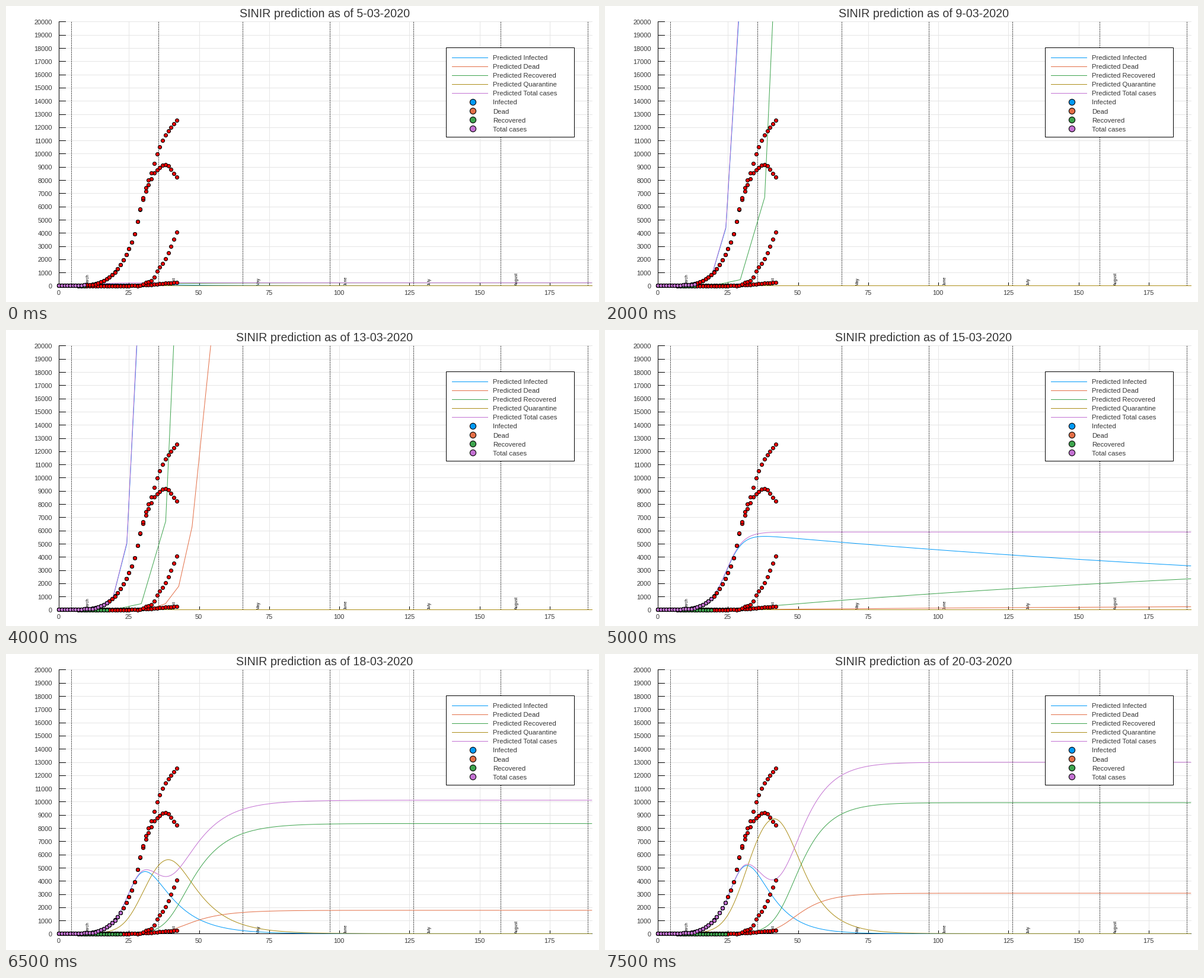
Write a matplotlib script that moves like this. It is 1000 px wide and 500 px high and loops after 8 s.

```python
import numpy as np
import matplotlib.pyplot as plt
from matplotlib.animation import FuncAnimation
from matplotlib.patches import Rectangle

PX = 0.72  # points per pixel at 100 dpi
FRAMES, STEP = 16, 500
DAY, X0, Y0, THOUSAND = 4.73, 89.1, 472.4, 22.3
BLUE, ORANGE, GREEN = "#009afa", "#e36f47", "#3ea44e"
PURPLE, OLIVE, INK = "#c371d2", "#ac8e18", "#363636"

plt.rcParams["font.family"] = "Liberation Sans"


def px(day):
    return X0 + DAY * np.asarray(day, float)


def py(count):
    return Y0 - THOUSAND * np.asarray(count, float) / 1000


LEFT, RIGHT, TOP, BOTTOM = px(0), px(190), py(20000), py(0)


def smooth(x, points):
    """Cubic Hermite curve through a few (day, count) points."""
    t, v = np.array(points, float).T
    slope = np.gradient(v, t)
    i = np.clip(np.searchsorted(t, x, "right") - 1, 0, len(t) - 2)
    h = t[i + 1] - t[i]
    s = np.clip((x - t[i]) / h, 0, 1)
    return ((1 + 2 * s) * (1 - s) ** 2 * v[i] + s * (1 - s) ** 2 * h * slope[i]
            + s * s * (3 - 2 * s) * v[i + 1] + s * s * (s - 1) * h * slope[i + 1])


# Recorded cases
days = np.arange(43)
total = smooth(days, [(0, 2), (5, 14), (9, 41), (14, 182), (17, 504),
                      (20, 1018), (25, 2814), (27, 3924), (28, 4880),
                      (31, 7430), (33, 8560), (35, 9980), (38, 11390),
                      (42, 12519)])
dead = smooth(days, [(0, 0), (16, 0), (24, 6), (28, 28), (32, 68), (36, 146),
                     (42, 243)])
recovered = smooth(days, [(0, 0), (27, 0), (29, 9), (31, 225), (34, 640),
                          (35, 1090), (38, 2022), (42, 4046)])
records = [total - dead - recovered, dead, recovered, total]

T = np.linspace(0, 190, 761)
RUNAWAY = (3, 4, 7, 8)

# Key forecasts, blended in between:
# frame, plateau, midpoint, growth, leaving rate, quarantine days, death share
KEYS = np.array([
    (0, 215, 13.3, 0.33, 0.05, 0, 0),
    (6, 3520, 23.5, 0.27, 0.00598, 0, 0),
    (10, 5880, 24.4, 0.335, 0.00346, 0, 0.087),
    (13, 10110, 25.9, 0.315, 0.1, 13.9, 0.175),
    (15, 12985, 27.4, 0.3, 0.128, 16.5, 0.236)])


def logistic(t, plateau, mid, growth):
    return plateau / (1 + np.exp(-growth * (t - mid)))


def settle(k):
    """Logistic spread; cases leave at a rate, then wait in quarantine."""
    plateau, mid, growth, leave, wait, share = (
        np.interp(k, KEYS[:, 0], col) for col in KEYS[:, 1:].T)
    caught = logistic(T, plateau, mid, growth)
    ill = caught.copy()
    keep = np.exp(-leave * T[1])
    for i in range(1, len(T)):
        ill[i] = ill[i - 1] * keep + caught[i] - caught[i - 1]
    left = caught - ill
    gone = np.interp(T - wait, T, left, left=0)
    return [(T, ill), (T, share * gone), (T, (1 - share) * gone),
            (T, left - gone), (T, ill + gone)]


def runaway(k):
    """Unchecked growth, sampled at coarse steps."""
    t = 4.85 * np.arange(8)
    cases = (4440 + 165 * (k - 4)) * np.exp((0.325 + 0.0025 * (k - 4)) * (t - 24.25))
    heal_t = np.array([0, 20, 29.4, 38.1, 42.8])
    healed = 6700 * np.exp(0.31 * (heal_t - 38.1))
    death_t = 4.75 * np.arange(41)
    deaths = (k > 6) * logistic(death_t, 32000, 52.2, 0.3)
    return [(t, 0.98 * cases), (death_t, deaths), (heal_t, healed),
            (T, 0 * T), (t, cases)]


fig = plt.figure(figsize=(10, 5), dpi=100, facecolor="white")
ax = fig.add_axes([0, 0, 1, 1])
ax.set_xlim(0, 1000)
ax.set_ylim(500, 0)
ax.axis("off")


def rule(xs, ys, color="black", z=2, **kw):
    return ax.plot(xs, ys, color=color, lw=PX, zorder=z, **kw)[0]


def label(x, y, text, size, ha="left", color=INK, z=3, **kw):
    return ax.text(x, y, text, fontsize=size * PX, ha=ha, va="baseline",
                   color=color, zorder=z, **kw)


def dots(xs, ys, color, z, size=6):
    return ax.plot(xs, ys, "o", ms=size * PX, mfc=color, mec="black",
                   mew=1.1 * PX, zorder=z)[0]


# Grid, axes and tick labels
for v in range(0, 20001, 1000):
    y = py(v)
    rule([LEFT, RIGHT], [y, y], "#e5e5e5", 1)
    rule([LEFT, LEFT + 11], [y, y])
    label(78, y + 4.6, str(v), 11, "right")
for d in range(0, 176, 25):
    x = px(d)
    rule([x, x], [TOP, BOTTOM], "#e5e5e5", 1)
    rule([x, x], [BOTTOM, BOTTOM - 5.3])
    label(x - 0.4, 488, str(d), 11, "center")
rule([LEFT, LEFT], [TOP, BOTTOM])
rule([LEFT, RIGHT], [BOTTOM, BOTTOM])

# Month boundaries
months = ["March", "April", "May", "June", "July", "August", ""]
for d, name in zip([4.5, 35.5, 65.5, 96.5, 126.5, 157.5, 188.5], months):
    x = px(d)
    rule([x, x], [BOTTOM, TOP], ls=(0, (1.5, 1.5)), dash_capstyle="butt")
    label(px(d + 5.5) + 2.8, 472, name, 7, color="black", rotation=90,
          rotation_mode="anchor")

# Legend
ax.add_patch(Rectangle((742, 70.4), 216, 151, fc="white", ec="black",
                       lw=PX, zorder=20))
line_colors = [BLUE, ORANGE, GREEN, OLIVE, PURPLE]
dot_colors = [BLUE, ORANGE, GREEN, PURPLE]
names = ["Infected", "Dead", "Recovered", "Quarantine", "Total cases"]
entries = [("Predicted " + n, c, True) for n, c in zip(names, line_colors)]
entries += [(n, c, False) for n, c in zip(names, line_colors) if c != OLIVE]
for i, (name, color, is_line) in enumerate(entries):
    y = 86.6 + 15.1 * i
    if is_line:
        rule([752, 812], [y, y], color, 21)
    else:
        dots([787], [y], color, 21, 10.2)
    label(821, y + 4.4, name, 11.4, z=21)

# Moving parts
window = Rectangle((LEFT, BOTTOM + 1), RIGHT - LEFT + 1, TOP - BOTTOM - 1,
                   transform=ax.transData)
curves = [rule([], [], color, 4) for color in line_colors]
for curve in curves:
    curve.set_clip_path(window)
for row in records:
    dots(px(days), py(row), "red", 5)
known = [dots([], [], color, 6) for color in dot_colors]
title = label(537.2, 19.3, "", 19.7, "center")


def update(k):
    title.set_text(f"SINIR prediction as of {5 + k}-03-2020")
    forecast = runaway(k) if k in RUNAWAY else settle(k)
    for curve, (t, v) in zip(curves, forecast):
        curve.set_data(px(t), py(v))
    n = 10 + k
    for marks, row in zip(known, records):
        marks.set_data(px(days[:n]), py(row[:n]))
    return curves + known + [title]


anim = FuncAnimation(fig, update, frames=FRAMES, interval=STEP, repeat=True,
                     repeat_delay=0, init_func=lambda: update(0), blit=False)
plt.show()
```
